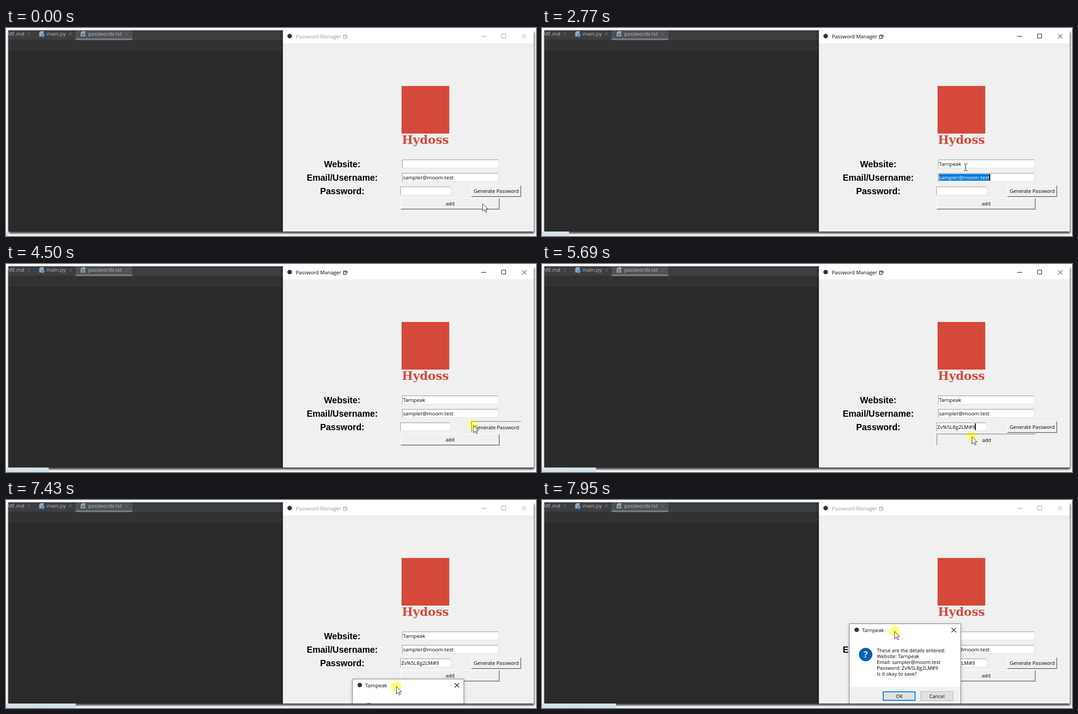
An HTML page for the animation above (8000 ms loop, 1179x463 px).

```html
<!DOCTYPE html>
<html lang="en">
<head>
<meta charset="utf-8">
<title>Password Manager</title>
<style>
  html, body { margin: 0; width: 100%; height: 100%; overflow: hidden; background: #fff; }
  svg { display: block; width: 100%; height: 100%; }
  text { font: 11px "Open Sans", "Noto Sans", sans-serif; white-space: pre; }
  .tab { font-size: 11.6px; fill: #bbb; }
  .title { font-size: 11.3px; }
  .entry { font-size: 11.5px; }
  .label { font: bold 19.5px "Liberation Sans", Arial, sans-serif; text-anchor: middle; }
  .brand { font: bold 26px "DejaVu Serif", serif; text-anchor: middle; fill: #d5493a; }
  .mid { text-anchor: middle; }
  .line { fill: none; stroke: currentColor; }
  .frame { filter: drop-shadow(1px 4px 2.5px rgba(0, 0, 0, .8)); }
  .panel { filter: drop-shadow(0 2px 4px rgba(0, 0, 0, .2)); }
  #caption { color: #999; }
  #caption.active { color: #000; }
  #caption text { fill: currentColor; }
  #glow { mix-blend-mode: multiply; }
  .button .tl { stroke: #fff; }
  .button .br { stroke: #696969; }
  .button .in { stroke: #a0a0a0; }
  .button.down .tl { stroke: #696969; }
  .button.down .br { stroke: #fff; }
  .button.down .in { stroke: #e3e3e3; }
  .button.down text { transform: translate(1px, 1px); }
</style>
</head>
<body>
<svg viewBox="0 0 1179 463" preserveAspectRatio="none">
  <defs>
    <clipPath id="screen"><path d="M5 5H1174V453H5z"/></clipPath>
    <linearGradient id="edge">
      <stop offset="0" stop-opacity="0"/>
      <stop offset="1" stop-opacity=".15"/>
    </linearGradient>
    <linearGradient id="sky" gradientUnits="userSpaceOnUse" x1="0" x2="170">
      <stop offset="0" stop-color="#d3e2ee"/>
      <stop offset=".25" stop-color="#d8e2e8"/>
      <stop offset=".4" stop-color="#d3e1ec"/>
      <stop offset="1" stop-color="#d5e2ec"/>
    </linearGradient>
  </defs>

  <path class="frame" d="M5 5H1174V453H5z" fill="#f0f0f0"/>

  <g clip-path="url(#screen)">
    <!-- editor -->
    <path d="M5 5H616V453H5z" fill="#2b2b2b"/>
    <path d="M5 26H616V50H5z" fill="#323232"/>
    <path d="M5 5H616V26H5z" fill="#3c3f41"/>
    <path d="M155 5H281V27H155z" fill="#4e5254"/>
    <path d="M155 23H281V27H155z" fill="#747a80"/>
    <text class="tab" x="3" y="17">ME.md</text>
    <text class="tab" x="90" y="17">main.py</text>
    <text class="tab" x="183" y="17">passwords.txt</text>
    <path class="line" color="#73777a" d="M47 10l7 7m0-7l-7 7M140 10l7 7m0-7l-7 7M265 10l7 7m0-7l-7 7"/>
    <path d="M77 7h7v12h-10v-9z" fill="#9aa7b0"/>
    <circle cx="82" cy="16" r="4" fill="#4a9bd0"/>
    <path d="M170 7h6v12h-10v-8z" fill="#9aa7b0"/>
    <path class="line" color="#4e5254" d="M168 12.5h6m-6 2h6m-6 2h6"/>
    <path d="M606 5H616V453H606z" fill="url(#edge)"/>

    <!-- form window -->
    <path d="M616 5H1174V34H616z" fill="#fff"/>
    <circle cx="631" cy="18" r="5" fill="#263746"/>
    <g id="caption">
      <text class="title" x="645" y="23">Password Manager</text>
      <path class="line" d="M750.5 17.5h6v6h-6zM751.5 17.5v-2q2-2.5 4 0v2M756 16.5l3-1v5l-2 2"/>
      <path class="line" d="M1057 18.5h11M1102.5 13.5h9v9h-9zM1148 13.5l10 10m0-10l-10 10"/>
    </g>
    <path d="M880 129h106v106h-106z" fill="#d5493a"/>
    <text class="brand" x="933" y="258">Hydoss</text>
    <text class="label" x="748" y="310">Website:</text>
    <text class="label" x="748" y="340">Email/Username:</text>
    <text class="label" x="748" y="370">Password:</text>

    <g id="form"></g>
    <path id="pick" fill="#0078d7"/>
    <text class="entry" id="site" x="883" y="307"></text>
    <text class="entry" id="mail" x="883" y="337"></text>
    <text class="entry" id="pass" x="879" y="367"></text>
    <path id="caret" d="M0 0h2v15h-2z"/>

    <!-- confirm box -->
    <g id="dialog">
      <path class="panel" d="M0 0H249V190H0z" fill="#fff"/>
      <path d="M0 141H249V190H0z" fill="#f0f0f0"/>
      <path class="line" color="#707070" d="M.5 .5H248.5V190H.5z"/>
      <circle cx="17" cy="14" r="5" fill="#263746"/>
      <text class="title" x="29" y="19" id="head"></text>
      <path class="line" color="#111" stroke-width="1.2" d="M228 9.5l10 10m0-10l-10 10"/>
      <circle cx="37" cy="69" r="14.5" fill="#0564b5" stroke="#0a4f8d"/>
      <text class="mid" x="37" y="76" fill="#fff" style="font-size:20px;font-weight:600">?</text>
      <g id="lines"></g>
      <path d="M76 152h71v19h-71z" fill="#e1e1e1" stroke="#0078d7" stroke-width="2"/>
      <path d="M159.5 151.5h72v20h-72z" fill="#e1e1e1" stroke="#adadad"/>
      <text class="mid" x="112" y="166">OK</text>
      <text class="mid" x="195.5" y="166">Cancel</text>
    </g>

    <circle id="glow" r="12" fill="#ffff80"/>
    <path id="arrow" d="M.5 .5V16.5L4.3 13L7 19L9.5 18L7 12H12z" fill="#fff" stroke="#222"/>
    <path id="beam" class="line" color="#111" d="M-3.5 -7.5H-1L.5 -6.5L2 -7.5H4.5M.5 -6.5V6.5M-3.5 7.5H-1L.5 6.5L2 7.5H4.5"/>
  </g>

  <rect id="bar" y="453" height="10" fill="url(#sky)"/>
</svg>
<script>
const LOOP = 8000, STEP = 172.8;
const SITE = "Tarnpeak", MAIL = "sampler@moom.test", PASS = "Zv%5L8g2LM#9";

const $ = id => document.getElementById(id);
const show = (id, on) => { $(id).style.display = on ? "" : "none"; };
const place = (id, x, y) => $(id).setAttribute("transform", `translate(${x} ${y})`);
const within = (n, a, b) => n >= a && n <= b;

const field = (x, y, w) => `
  <path d="M${x} ${y}h${w}v19h${-w}z" fill="#fff"/>
  <path class="line" color="#e3e3e3" d="M${x} ${y + 18.5}h${w - .5}v-18"/>
  <path class="line" color="#8a8a8a" d="M${x + .5} ${y + 19}v-18.5h${w - 1}"/>`;

const button = (id, x, y, w, label) => `
  <g class="button" id="${id}">
    <path class="line in" d="M${x + 1} ${y + 24.5}h${w - 2.5}v-23"/>
    <path class="line br" d="M${x} ${y + 25.5}h${w - .5}v-25"/>
    <path class="line tl" d="M${x + .5} ${y + 25}v-24.5h${w - 1}"/>
    <text class="mid" x="${x + w / 2}" y="${y + 17}">${label}</text>
  </g>`;

$("form").innerHTML = field(881, 293, 214) + field(881, 323, 214) + field(877, 353, 112)
  + button("make", 1035, 350, 111, "Generate Password")
  + button("add", 878, 378, 220, "add");

$("head").textContent = SITE;
$("mail").textContent = MAIL;
$("lines").innerHTML = [
  "These are the details entered:", "Website: " + SITE, "Email: " + MAIL,
  "Password: " + PASS, "Is it okay to save?"
].map((s, i) => `<text x="62" y="${64 + 13 * i}">${s}</text>`).join("");

// pointer stops: step, x, y
const stops = [
  [0, 1060, 391], [1, 1060, 391], [4, 942, 310], [21, 942, 310], [25, 1039, 359],
  [28, 1039, 359], [32, 956, 384], [36, 956, 384], [40, 868, 415], [43, 868, 415], [46, 784, 292]
];

function along(n, path) {
  const i = path.findIndex(p => p[0] >= n);
  if (i < 0) return path[path.length - 1].slice(1);
  if (i === 0) return path[0].slice(1);
  const [a, b] = [path[i - 1], path[i]];
  const u = (n - a[0]) / (b[0] - a[0]), e = u * u * (3 - 2 * u);
  return [1, 2].map(k => Math.round(a[k] + (b[k] - a[k]) * e));
}

function drawCaret(n) {
  let owner = null, y = 295;
  if (within(n, 5, 15)) owner = "site";
  else if (within(n, 16, 17)) { owner = "mail"; y = 325; }
  else if (within(n, 18, 33) && (n - 18) % 5 < 3) { owner = "pass"; y = 355; }
  show("caret", owner);
  if (!owner) return;
  const el = $(owner), width = el.textContent ? el.getComputedTextLength() : -1;
  place("caret", Math.round(+el.getAttribute("x") + width), y);
}

function draw(now) {
  const n = Math.floor((now % LOOP + 17) / STEP);
  const [x, y] = along(n, stops);

  $("bar").setAttribute("width", Math.round(4 + 3.5 * n));
  $("caption").classList.toggle("active", within(n, 5, 33));

  $("site").textContent = SITE.slice(0, Math.max(0, n - 7));
  $("pass").textContent = n >= 27 ? PASS : "";
  const picked = within(n, 16, 17);
  show("pick", picked);
  $("pick").setAttribute("d", `M883 325h${$("mail").getComputedTextLength()}v15H883z`);
  $("mail").setAttribute("fill", picked ? "#fff" : "#000");
  drawCaret(n);

  $("make").classList.toggle("down", n === 26);
  $("add").classList.toggle("down", n === 33);

  show("dialog", n >= 35);
  place("dialog", ...along(n, [[43, 770, 398], [46, 683, 275]]));

  const typing = within(n, 4, 21);
  show("beam", typing);
  show("arrow", !typing);
  place(typing ? "beam" : "arrow", x, y);
  show("glow", n === 5 || n === 26 || n === 33 || n >= 43);
  place("glow", x, y);
}

const start = performance.now();
function tick() {
  draw(performance.now() - start);
  requestAnimationFrame(tick);
}
tick();
</script>
</body>
</html>
```
